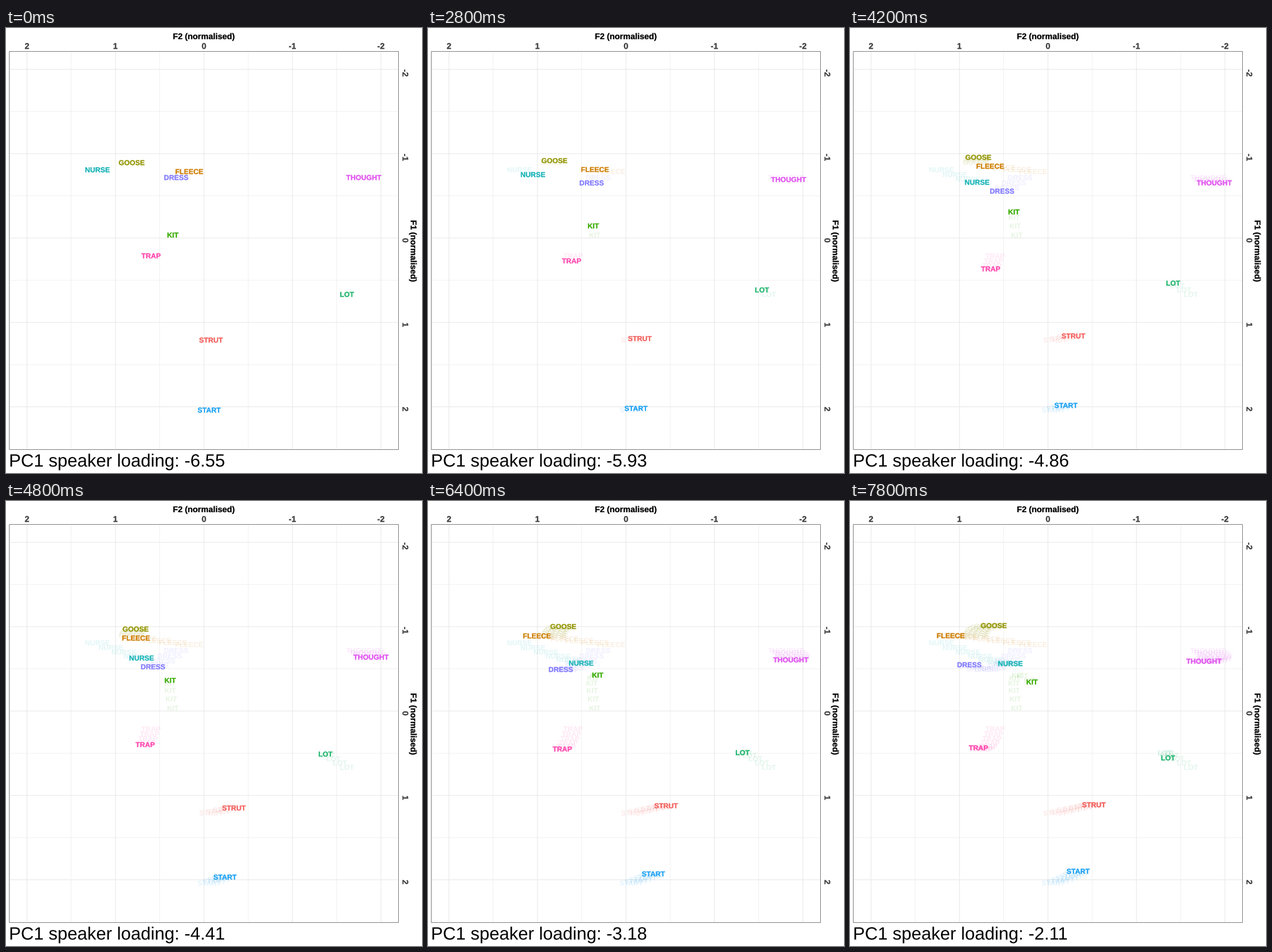
These frames come from a looping animation (700x750 px, 8000 ms). A matplotlib script:

```python
import numpy as np
import matplotlib.pyplot as plt
from matplotlib.animation import FuncAnimation
from matplotlib.patches import PathPatch, Rectangle
from matplotlib.textpath import TextPath
from matplotlib.transforms import Affine2D

W, H, DPI = 700, 750, 100
PX = 72 / DPI        # one pixel in points
FRAMES, STEP_MS = 40, 200
HOLD = 10            # frames before the vowels start to move
MOVES = FRAMES - HOLD - 1
TRAIL_GAP = 4        # frames between two trail marks
WORD_SIZE = 12

# word: colour, start, heading (pixels per frame), end
VOWELS = {
    "DRESS": ("#827aff", (286.5, 252), (-2.74, 2.3), (201, 276)),
    "FLEECE": ("#ce7d00", (308.5, 242), (-6.89, -0.87), (169.5, 227)),
    "GOOSE": ("#929500", (211.5, 227), (0.3, -0.86), (242, 210)),
    "KIT": ("#35ab00", (281, 349), (-0.68, -3.89), (306.5, 305)),
    "LOT": ("#1db46b", (574, 449), (-2.96, -1.92), (535.5, 433)),
    "NURSE": ("#17b3b7", (154, 239), (5.7, 2.03), (270, 274)),
    "START": ("#1ba1f4", (342, 644), (2.04, -0.73), (384, 624)),
    "STRUT": ("#f35e5a", (345, 526), (2.91, -0.66), (410.5, 512)),
    "THOUGHT": ("#e04ff0", (602, 252), (1.21, 0.85), (595.5, 270)),
    "TRAP": ("#ff45ae", (244, 384), (-0.63, 2.15), (216, 416)),
}

fig = plt.figure(figsize=(W / DPI, H / DPI), dpi=DPI, facecolor="white")
ax = fig.add_axes([0, 0, 1, 1])
ax.set_xlim(0, W)
ax.set_ylim(H, 0)
ax.axis("off")


def outline(text, size, weight="bold"):
    return TextPath((0, 0), text, size=size,
                    prop={"family": "Liberation Sans", "weight": weight})


def placed(x, y, turn=0):
    return Affine2D().scale(1, -1).rotate_deg(turn).translate(x, y) + ax.transData


def add_text(path, x, y, color, turn=0, alpha=1, z=3, stroke=0.3):
    patch = PathPatch(path, fc=color, ec=color, lw=stroke * PX, alpha=alpha,
                      zorder=z, snap=False, transform=placed(x, y, turn))
    return ax.add_patch(patch)


def mid(path):
    box = path.get_extents()
    return (box.x0 + box.x1) / 2


def grid_line(xs, ys, major):
    ax.plot(xs, ys, color="#e8e8e8", lw=(1.07 if major else 0.6) * PX,
            zorder=1, snap=False, solid_capstyle="butt")


# Grid, tick labels and frame
left, right, top, bottom = 5.5, 660.5, 39.5, 710.5
for v in np.arange(-2, 2.1, 0.5):
    major = v == int(v)
    x, y = 333.1 - 148.9 * v, 354 + 142.2 * v
    grid_line([x, x], [top, bottom], major)
    grid_line([left, right], [y, y], major)
    if major:
        tick = outline(f"{v:.0f}", 14)
        add_text(tick, x - mid(tick), 35.2, "#3c3c3c")
        add_text(tick, 667.2, y, "#3c3c3c", turn=90)

ax.add_patch(Rectangle((left, top), right - left, bottom - top, fill=False,
                       ec="#808080", lw=PX, zorder=4, snap=False))

# Axis titles
title = outline("F2 (normalised)", 14)
add_text(title, 333 - mid(title), 18.8, "black")
title = outline("F1 (normalised)", 14)
add_text(title, 681, 376 - mid(title), "black", turn=90)


class Vowel:
    """A word that leaves along its heading and bends towards its end."""

    def __init__(self, word, color, start, heading, end):
        shape = outline(word, WORD_SIZE)
        to_baseline = (-mid(shape), 0.344 * WORD_SIZE)
        self.start = np.add(start, to_baseline)
        self.heading = np.array(heading)
        self.bend = np.subtract(end, start) - self.heading * MOVES
        self.trail = [add_text(shape, *self.at(k), color, alpha=0.12, z=2, stroke=0)
                      for k in range(0, MOVES, TRAIL_GAP)]
        self.label = add_text(shape, *self.at(0), color)

    def at(self, k):
        return self.start + self.heading * k + self.bend * (k / MOVES) ** 3

    def show(self, k):
        self.label.set_transform(placed(*self.at(k)))
        for i, mark in enumerate(self.trail):
            mark.set_visible(i * TRAIL_GAP < k)


def caption_path(k):
    loading = -6.5451 + 0.1528 * k
    return outline(f"PC1 speaker loading: {loading:.2f}", 30, "normal")


vowels = [Vowel(word, *spec) for word, spec in VOWELS.items()]
caption = add_text(caption_path(0), 5, 739.2, "black", stroke=0)


def draw(frame):
    k = max(0, frame - HOLD)
    for vowel in vowels:
        vowel.show(k)
    caption.set_path(caption_path(k))
    return []


anim = FuncAnimation(fig, draw, frames=FRAMES, interval=STEP_MS,
                     repeat=True, repeat_delay=0, blit=False)
plt.show()
```
